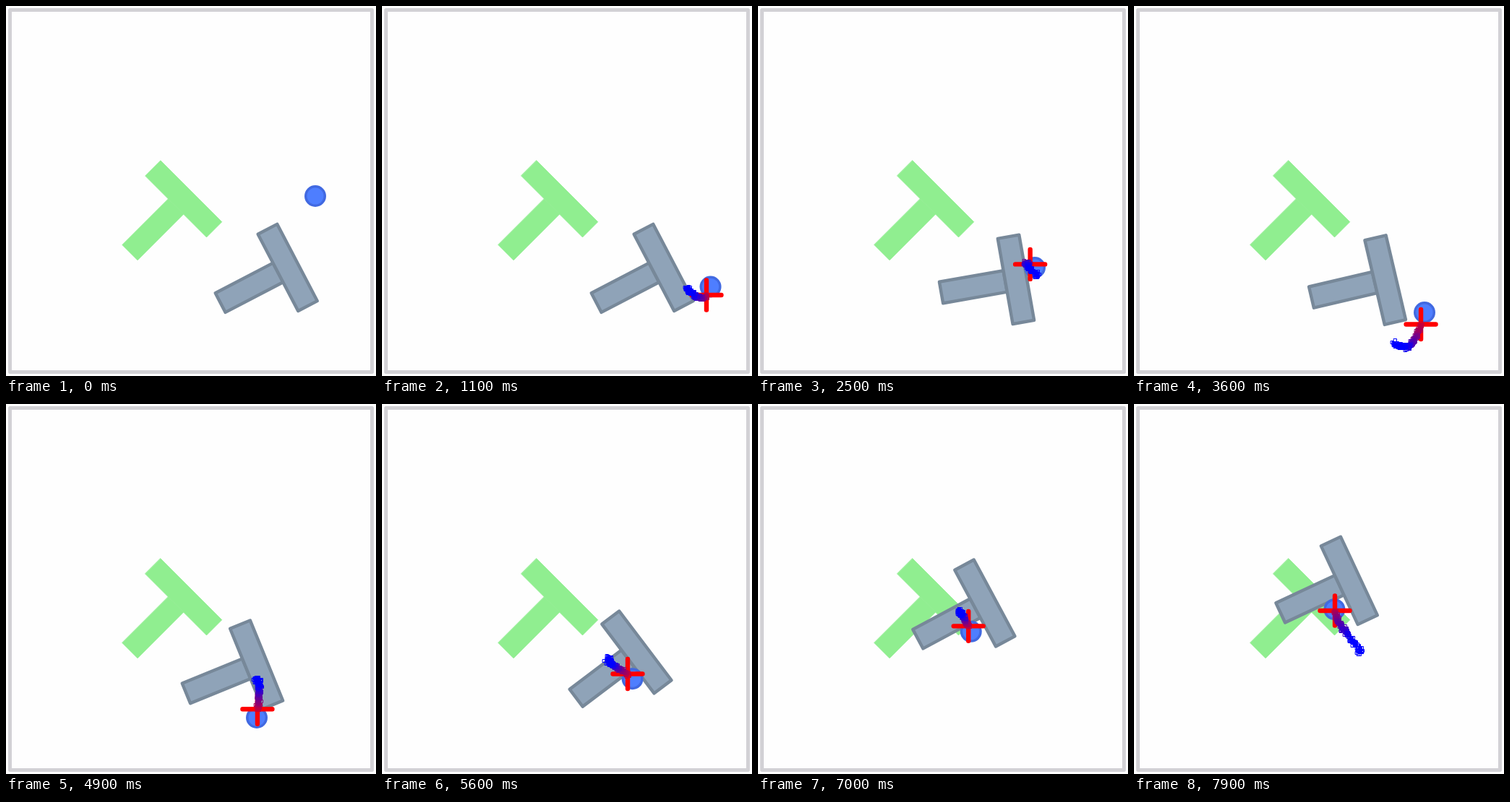
Recreate the animation shown at these times as an HTML page with a canvas. Size 512 px wide and 512 px high, loop 8000 ms.

```html
<!DOCTYPE html>
<html lang="en">
<head>
<meta charset="utf-8">
<title>Push T</title>
<style>
html, body { margin: 0; width: 100%; height: 100%; overflow: hidden; background: #fefefe; }
canvas { display: block; width: 512px; height: 512px; }
</style>
</head>
<body>
<canvas id="stage" width="512" height="512"></canvas>
<script>
const ctx = document.getElementById('stage').getContext('2d');
const LOOP = 8000, STEP = 100;
const LEAD = 150;      // the cross marks where the agent is heading
const HORIZON = 550;   // the dotted plan runs on from the cross

// Block pose: time, x, y, angle in degrees
const block = [
  [1300, 403, 355, 62.4],
  [1850, 391.5, 367, 71.5],
  [2500, 371.7, 375.7, 80],
  [2750, 362.3, 375.7, 76.8],
  [4550, 362.3, 375.7, 76.8],
  [4900, 360.5, 355, 67.8],
  [5550, 366, 337, 52.5],
  [6200, 345, 303.2, 58.2],
  [7700, 311.4, 238, 64.9]
];

// Agent path: time, x, y; it reaches past the loop so the plan has somewhere to go
const agent = [
  [0, 428, 263],
  [450, 441, 300],
  [900, 458, 366],
  [1250, 449, 400],
  [1550, 436, 402],
  [1900, 416, 386],
  [2500, 383, 362],
  [2750, 374, 356],
  [3050, 373, 360],
  [3350, 402, 390],
  [3600, 402, 424],
  [4100, 380, 470],
  [4500, 346, 459],
  [4900, 347, 434],
  [5550, 348, 383],
  [6200, 316, 357],
  [7200, 290, 305],
  [7700, 279, 287],
  [8050, 278, 286],
  [8300, 285, 304],
  [8600, 314, 343]
];

// Interpolates keys, with slopes taken from the neighbours when smooth.
function at(keys, t, smooth) {
  const last = keys.length - 1;
  if (t <= keys[0][0]) return keys[0].slice(1);
  if (t >= keys[last][0]) return keys[last].slice(1);
  const i = keys.findIndex(k => k[0] > t) - 1;
  const a = keys[i], b = keys[i + 1], span = b[0] - a[0], p = (t - a[0]) / span;
  const slope = (k, j) => {
    const from = keys[Math.max(0, k - 1)], to = keys[Math.min(last, k + 1)];
    return (to[j] - from[j]) / (to[0] - from[0]) * span;
  };
  return a.slice(1).map((v, n) => {
    const j = n + 1, d = b[j] - v;
    if (!smooth) return v + d * p;
    const bend = (slope(i, j) - d) * (1 - p) - (slope(i + 1, j) - d) * p;
    return v + d * p + p * (1 - p) * bend;
  });
}

function random(seed) {
  let s = seed * 7919 + 17;
  return () => (s = (s * 16807) % 2147483647) / 2147483647;
}

function drawTee(x, y, deg, fill, line) {
  ctx.save();
  ctx.translate(x, y);
  ctx.rotate(deg * Math.PI / 180);
  ctx.fillStyle = fill;
  ctx.strokeStyle = line;
  ctx.lineWidth = line === fill ? 0.8 : 4.4;
  ctx.lineJoin = 'round';
  for (const box of [[-15, 30, 30, 90], [-60, 0, 120, 30]]) {
    ctx.fillRect(...box);
    ctx.strokeRect(...box);
  }
  ctx.restore();
}

function disc(x, y, r, color) {
  ctx.fillStyle = color;
  ctx.beginPath();
  ctx.arc(x, y, r, 0, 2 * Math.PI);
  ctx.fill();
}

function drawCross(x, y) {
  const arm = 20.5;
  ctx.strokeStyle = '#ff0000';
  ctx.lineWidth = 6.4;
  ctx.lineCap = 'round';
  ctx.beginPath();
  ctx.moveTo(x - arm, y);
  ctx.lineTo(x + arm, y);
  ctx.moveTo(x, y - arm);
  ctx.lineTo(x, y + arm);
  ctx.stroke();
}

function drawPlan(t) {
  const rnd = random(t / STEP), noise = () => rnd() + rnd() + rnd() - 1.5;
  const steps = 24, samples = 10;
  ctx.lineWidth = 1;
  for (let i = 0; i < steps; i++) {
    const p = i / (steps - 1), c = Math.min(1, 0.2 + p);
    const spread = 2.4 + 1.6 * p;
    ctx.strokeStyle = `rgb(${255 * (1 - c)}, 0, ${255 * c})`;
    for (let n = 0; n < samples; n++) {
      const [x, y] = at(agent, t + LEAD + HORIZON * p * (1 + 0.06 * noise()), true);
      const px = Math.round(x + noise() * spread), py = Math.round(y + noise() * spread);
      ctx.strokeRect(px - 1.5, py - 1.5, 4, 4);
    }
  }
}

function draw(t) {
  ctx.fillStyle = '#fefefe';
  ctx.fillRect(0, 0, 512, 512);
  ctx.strokeStyle = '#d2d1d5';
  ctx.lineWidth = 5;
  ctx.lineJoin = 'round';
  ctx.strokeRect(5.5, 5.5, 501, 501);

  drawTee(256.3, 256.3, 45, '#90ee90', '#90ee90');
  drawTee(...at(block, t), '#8fa3b8', '#778899');
  const [x, y] = at(agent, t, true);
  disc(x, y, 15, '#4169e1');
  disc(x, y, 11.5, '#4e7eff');

  if (t < STEP) return;
  drawCross(...at(agent, t + LEAD, true));
  drawPlan(t);
}

const start = performance.now();
let shown = -1;
function tick() {
  const t = Math.floor((performance.now() - start) % LOOP / STEP) * STEP;
  if (t !== shown) draw(shown = t);
  requestAnimationFrame(tick);
}
tick();
</script>
</body>
</html>
```
